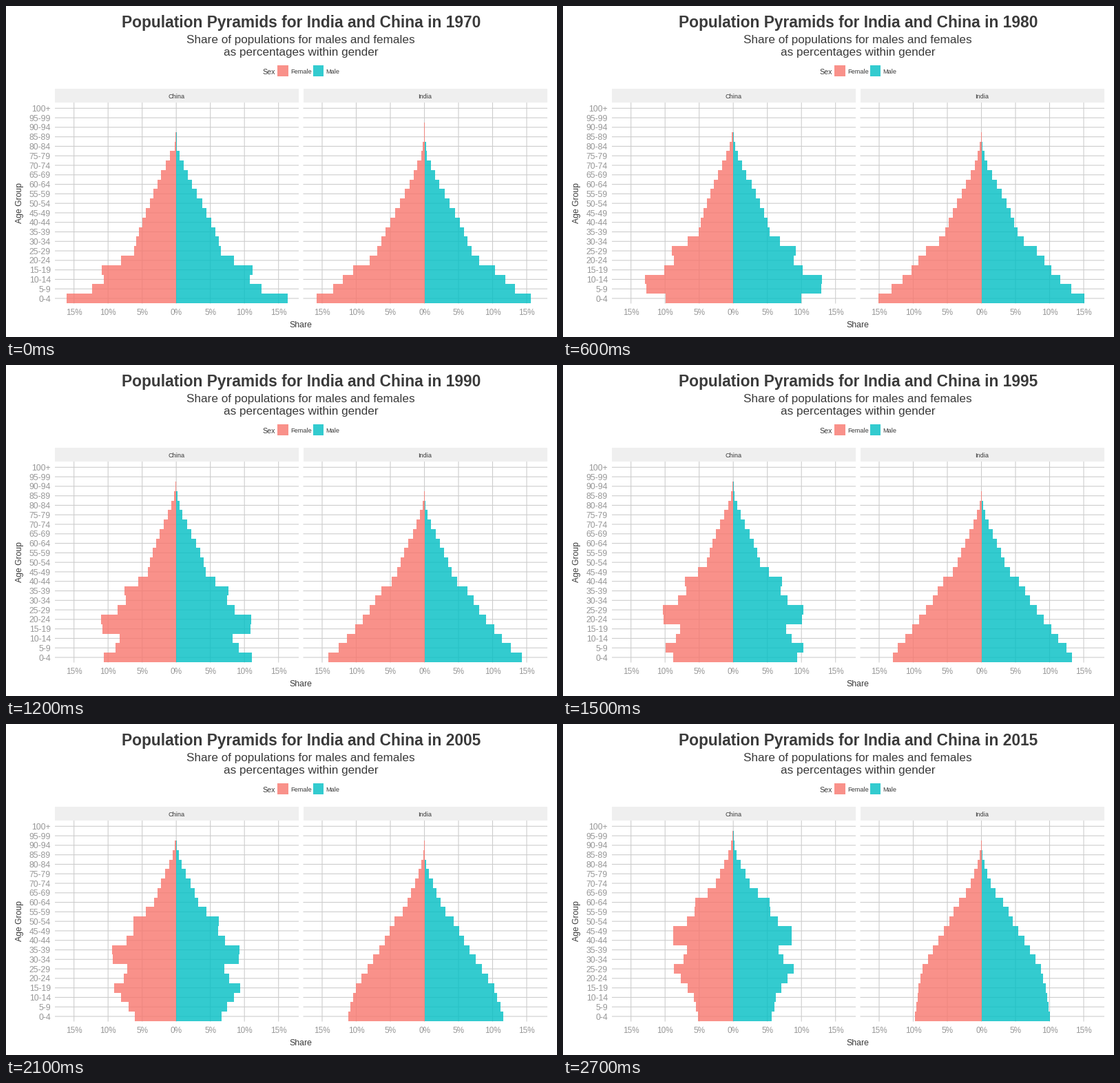
A matplotlib script for the animation above (3000 ms loop, 800 by 480 pixels).

```python
import matplotlib.pyplot as plt
import numpy as np
from matplotlib.animation import FuncAnimation
from matplotlib.patches import Rectangle

WIDTH, HEIGHT, DPI = 800, 480, 100
FIRST_YEAR, STEP, STEPS = 1970, 5, 10
AGES = np.arange(21)
ROW, BOTTOM = 13.785, 424.01
PERCENT = 9.9  # pixels per percentage point
SMALLEST = 0.015  # shares below this are not drawn

DARK, GREY, GRID, STRIP = "#3b3b3b", "#979797", "#cccccc", "#efefef"
FEMALE, MALE = "#f8766d", "#00bfc4"

plt.rcParams["font.family"] = "Liberation Sans"


def curve(knots):
    xs, ys = zip(*knots)
    return lambda x: np.interp(x, xs, ys)


def pyramids(start, ageing, early, fade):
    """Age every cohort step by step from its starting size; shares in percent."""
    people = start(-AGES)
    for step in range(STEPS):
        yield 100 * people / people.sum()
        old_loss = ageing * 0.92 ** step * 0.00063 * np.exp(0.45 * AGES)
        early_loss = early * fade ** step * (0.028 * np.exp(-AGES) + 0.008)
        survivors = people * np.exp(-old_loss - early_loss)
        people = np.append(start(step + 1), survivors[:-1])


def both_sexes(size, sex_ratio, ageing, early, fade):
    female = pyramids(size, ageing, early, fade)
    male = pyramids(lambda c: size(c) * sex_ratio(c), 1.25 * ageing, early, fade)
    return list(female), list(male)


# Knots are (birth cohort in five-year steps from 1970, size or male/female ratio).
china = both_sexes(
    curve([(-18, 0), (-16, 0.25), (-13, 2.2), (-10, 3.9), (-7, 5.5), (-5, 6.2),
           (-4, 8.1), (-3, 10.9), (-2, 10.6), (-1, 12.4), (0, 16.15), (1, 15.6),
           (2, 11.75), (3, 12.5), (4, 14.7), (6, 11.1), (7, 9.65), (9, 8.5)]),
    curve([(-17, 0.4), (-13, 0.77), (-10, 0.99), (-6, 1.06), (-1, 1.01),
           (2, 1.01), (8, 1.14)]),
    ageing=1, early=1, fade=0.7)
india = both_sexes(
    curve([(-19, 0), (-17, 0.07), (-15, 0.45), (-12, 2.2), (-6, 6.4), (-5, 7.0),
           (-4, 8.1), (-3, 10.55), (-1, 13.5), (0, 15.9), (4, 21.8), (6, 22.7),
           (9, 22.8)]),
    curve([(-17, 0.8), (-13, 1.0), (-9, 1.06), (-6, 1.0), (0, 0.985), (9, 1.02)]),
    ageing=1.6, early=1.7, fade=0.88)

fig = plt.figure(figsize=(WIDTH / DPI, HEIGHT / DPI), dpi=DPI, facecolor="white")
ax = fig.add_axes([0, 0, 1, 1])
ax.set_xlim(0, WIDTH)
ax.set_ylim(HEIGHT, 0)
ax.axis("off")


def label(x, baseline, text, px, color=DARK, **kw):
    kw = {"ha": "center", "va": "baseline", **kw}
    return ax.text(x, baseline, text, fontsize=px * 72 / DPI, color=color, **kw)


def box(x, y, w, h, color, **kw):
    return ax.add_patch(Rectangle((x, y), w, h, facecolor=color, linewidth=0, **kw))


def line(xs, ys):
    ax.plot(xs, ys, color=GRID, lw=0.77, zorder=0, solid_capstyle="butt", snap=False)


def row_y(age):
    return BOTTOM - age * ROW


def draw_panel(name, left, right, zero):
    box(left, 120, right - left, 20, STRIP)
    label((left + right) / 2 - 0.5, 134, name, 9.2)
    for age in AGES:
        line([left, right], [row_y(age)] * 2)
    for percent in range(-15, 16, 5):
        x = zero + percent * PERCENT
        line([x, x], [140, 431.5])
        label(x, 448, f"{abs(percent)}%", 11.8, GREY)


def make_bars(zero, color):
    return [box(zero, row_y(age) - ROW / 2, 0, ROW, color, alpha=0.8, zorder=2)
            for age in AGES]


title = label(428.5, 31, "", 22.75, weight="bold")
label(428, 54, "Share of populations for males and females", 17.1)
label(428.5, 72, "as percentages within gender", 17.1)

label(372, 99, "Sex", 10.6, ha="left")
for key_x, text_x, text, color in ((394.3, 413, "Female", FEMALE),
                                   (446, 464, "Male", MALE)):
    box(key_x, 86, 15.4, 16, color, alpha=0.8)
    label(text_x, 98, text, 9.1, ha="left")

for age in AGES:
    low = age * STEP
    text = f"{low}-{low + STEP - 1}" if low < 100 else "100+"
    label(65, row_y(age) + 4.6, text, 12.3, GREY, ha="right")
label(428, 466, "Share", 12.2)
label(20, 285.5, "Age Group", 12.1, rotation=90, va="center")

bars = []
for name, left, right, zero, (female, male) in (
        ("China", 71, 425, 247.2, china),
        ("India", 431.5, 786, 607.5, india)):
    draw_panel(name, left, right, zero)
    bars.append((make_bars(zero, FEMALE), female, -PERCENT))
    bars.append((make_bars(zero, MALE), male, PERCENT))


def update(step):
    year = FIRST_YEAR + step * STEP
    title.set_text(f"Population Pyramids for India and China in {year}")
    for rows, shares, scale in bars:
        for bar, share in zip(rows, shares[step]):
            bar.set_width(scale * share if share > SMALLEST else 0)
    return []


animation = FuncAnimation(fig, update, frames=STEPS, interval=300,
                          repeat=True, repeat_delay=0)
plt.show()
```
